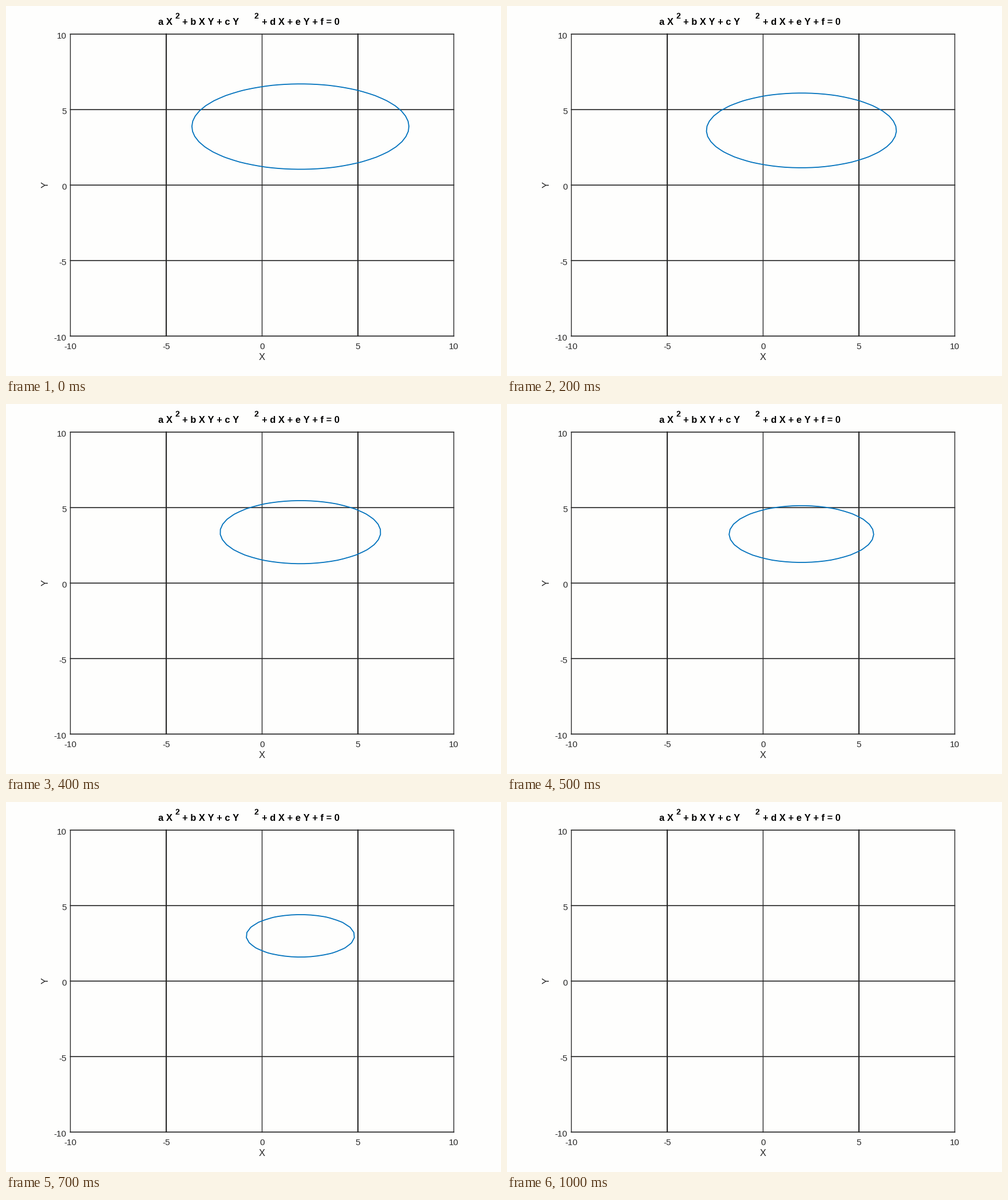
A matplotlib script for the animation above (1200 ms loop, 865x647 px).

```python
import matplotlib.pyplot as plt
import numpy as np
from matplotlib.animation import FuncAnimation

W, H, DPI = 865, 647, 128
PT = 72 / DPI  # points per pixel
LEFT, RIGHT, TOP, BOTTOM = 112.45, 782.45, 49.2, 577.2
INK, BLUE, PAPER = "#262626", "#0072BD", "#fefefd"
STEPS, INTERVAL = 12, 100
TICKS = range(-10, 11, 5)

plt.rcParams["font.family"] = "Liberation Sans"
plt.rcParams["text.kerning_factor"] = 6
fig = plt.figure(figsize=(W / DPI, H / DPI), dpi=DPI, facecolor=PAPER)
ax = fig.add_axes([LEFT / W, 1 - BOTTOM / H,
                   (RIGHT - LEFT) / W, (BOTTOM - TOP) / H])
ax.set(xlim=(-10, 10), ylim=(-10, 10))
ax.axis("off")


def label(x, y, text, size, **style):
    """Write text with its baseline at pixel (x, y), y counted downwards."""
    style = {"color": INK, "va": "baseline", **style}
    fig.text(x / W, 1 - y / H, text, fontsize=size * PT, **style)


def draw_grid():
    line = {"color": INK, "clip_on": False, "zorder": 1}
    for t in TICKS:
        wide = 2.1 if abs(t) == 5 else 1.4
        ax.axvline(t, lw=wide * PT, **line)
        ax.axhline(t, lw=1.7 * PT, snap=False, **line)
        share = (t + 10) / 20
        label(LEFT + share * (RIGHT - LEFT), 600, str(t), 15.2, ha="center")
        label(105.5, BOTTOM - share * (BOTTOM - TOP) + 8, str(t), 15.2,
              ha="right")
    label(447.6, 619, "X", 16.5, ha="center")
    label(76.5, 312.5, "Y", 16.5, rotation=90, ha="right", va="center")


def draw_title():
    bold = {"weight": "bold", "color": "black"}
    for x, part in ((266.5, "a X"), (308.4, "+ b X Y + c Y"),
                    (447.4, "+ d X + e Y + f = 0")):
        label(x, 33, part, 16.5, **bold)
    for x in (295, 433):
        label(x, 22, "2", 14, **bold)


def conic(step):
    """Contour of X^2 + 4 Y^2 - 4 X + e Y + 32 = 0 with e rising by one."""
    axis = np.linspace(-10, 10, 60)
    x, y = np.meshgrid(axis, axis)
    z = x**2 + 4 * y**2 - 4 * x + (step - 31) * y + 32
    if z.min() >= 0:  # no real points left
        return None
    return ax.contour(x, y, z, levels=[0], colors=BLUE,
                      linewidths=1.8 * PT, zorder=3)


draw_grid()
draw_title()
curves = [conic(step) for step in range(STEPS)]


def update(frame):
    shown = [c for c in curves if c is not None]
    for curve in shown:
        curve.set_visible(curve is curves[frame])
    return shown


anim = FuncAnimation(fig, update, frames=STEPS, interval=INTERVAL,
                     repeat=True, repeat_delay=0, blit=False)
plt.show()
```
